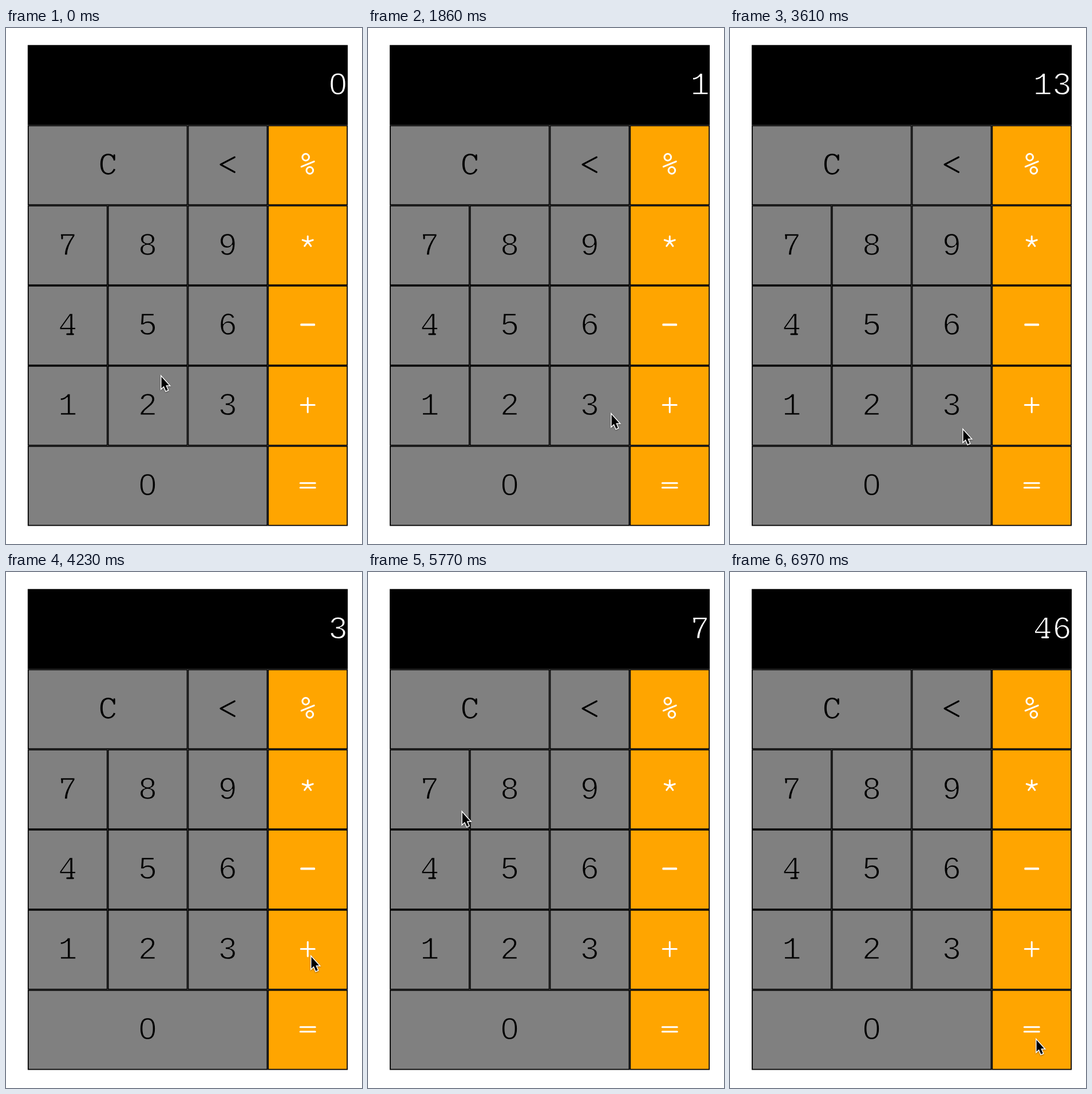
An HTML page that plays this animation: 622x900 px, repeating every 8 s.

```html
<!DOCTYPE html>
<html lang="en">
<head>
<meta charset="utf-8">
<title>Calculator</title>
<style>
  html, body { margin: 0; width: 100%; height: 100%; overflow: hidden; background: #fff; }
  svg { display: block; width: 622px; height: 900px; }
  text { font: 56px "Liberation Mono", "Courier New", monospace; text-anchor: middle; stroke-width: 1.5; }
  path { fill: none; stroke-width: 3; stroke-linecap: round; stroke-linejoin: round; }
  #cursor path { fill: #000; stroke: #fff; paint-order: stroke; stroke-linejoin: miter; }
  #cursor { filter: drop-shadow(0 1px 1px rgba(0, 0, 0, .4)); }
</style>
</head>
<body>
<svg viewBox="0 0 622 900">
  <g id="keys"></g>
  <g id="display"></g>
  <g id="cursor"><path d="M1.5 3.3V23.6L5.8 19.6L9.4 28L12.7 26.6L9.2 18.3H15Z"/></g>
</svg>
<script>
const LOOP = 8000, STEP = 78, PRESS = 240;
const CELL = 139.8, LEFT = 37.9, TOP = 29.7, LINE = 1.8, BASELINE = 16.4, ADVANCE = 33.6;
const $ = id => document.getElementById(id);

const bar = (y, half) => `M${-half} ${y}H${half}`;
const ring = (x, y, r) => `M${x - r} ${y}a${r} ${r} 0 1 0 ${2 * r} 0a${r} ${r} 0 1 0 ${-2 * r} 0`;
const star = (y, r) => [0, 1, 2, 3, 4].map(i => {
  const a = i * Math.PI * 2 / 5;
  return `M0 ${y}L${r * Math.sin(a)} ${y - r * Math.cos(a)}`;
}).join('');

// Operator signs, relative to the middle of their key
const signs = {
  '%': 'M-11 2.5L11 -6.5' + ring(-3.5, -14, 5.8) + ring(3.6, 9, 5.8),
  '*': star(-6.5, 9.5) + star(-6.5, 6),
  '-': bar(-2.1, 11.5) + bar(-.9, 11.5),
  '+': bar(-1.3, 12) + 'M0 -13.5V11.5',
  '=': bar(-4.8, 13) + bar(3.2, 13),
  '<': 'M12 -14L-12.5 -1.3L12 12'
};
// Slab serifs added to the plain letterforms, relative to the baseline
const serifs = { 4: 'M-1 -1.5H9.5', 7: 'M-9.8 -34V-28.5', C: 'M11.5 -34V-26' };

// The background-coloured outline thins the strokes of the glyph
function glyph(ch, x, y, ink, paper) {
  const at = dy => `transform="translate(${x} ${y + dy})"`;
  if (signs[ch]) return `<path ${at(0)} aria-label="${ch}" d="${signs[ch]}" stroke="${ink}"/>`;
  let out = `<text x="${x}" y="${y + BASELINE}" fill="${ink}" stroke="${paper}">${ch}</text>`;
  if (serifs[ch]) out += `<path ${at(BASELINE)} d="${serifs[ch]}" stroke="${ink}"/>`;
  if (ch === '0') out += `<ellipse ${at(BASELINE)} cy="-18.4" rx="5" ry="8.5" fill="${paper}"/>`;
  return out;
}

function box(col, row, span, paper) {
  return `<rect x="${LEFT + col * CELL + LINE / 2}" y="${TOP + row * CELL + LINE / 2}"
    width="${span * CELL - LINE}" height="${CELL - LINE}"
    fill="${paper}" stroke="#000" stroke-width="${LINE}"/>`;
}

// Repeated characters make one wide key
const rows = ['CC<%', '789*', '456-', '123+', '000='];
let html = box(0, 0, 4, '#000');
rows.forEach((row, r) => {
  for (let c = 0, span; c < 4; c += span) {
    const ch = row[c];
    span = row.lastIndexOf(ch) - c + 1;
    const [ink, paper] = c === 3 ? ['#fff', '#ffa500'] : ['#000', '#808080'];
    html += box(c, r + 1, span, paper) +
      glyph(ch, LEFT + (c + span / 2) * CELL, TOP + (r + 1.5) * CELL, ink, paper);
  }
});
$('keys').innerHTML = html;

// Pointer moves; a key pressed after arrival changes the reading
const moves = [
  { start: 0, end: 0, to: [270, 605], reads: '0' },
  { start: 440, end: 440, to: [266, 607] },
  { start: 580, end: 580, to: [149, 609] },
  { start: 840, end: 1300, to: [97, 669], reads: '1' },
  { start: 1700, end: 1860, to: [424, 671], reads: '13' },
  { start: 2260, end: 2590, to: [567, 382] },
  { start: 2920, end: 3610, to: [406, 698], reads: '3' },
  { start: 3930, end: 4080, to: [532, 668], reads: '39' },
  { start: 4250, end: 4790, to: [154, 465] },
  { start: 4870, end: 4950, to: [121, 387], reads: '7' },
  { start: 5770, end: 6090, to: [528, 667] },
  { start: 6160, end: 6330, to: [604, 775] },
  { start: 6400, end: 6560, to: [550, 832] },
  { start: 6730, end: 6730, to: [534, 813], reads: '46' }
];

const ease = u => u * u * (3 - 2 * u);

// The pointer advances in equal time steps, the first one at the start of the move
function cursorAt(t) {
  const i = moves.findLastIndex(m => t >= m.start);
  const { start, end, to } = moves[i];
  const from = i ? moves[i - 1].to : to;
  const gaps = Math.round((end - start) / STEP);
  const done = gaps ? Math.floor((t - start) / (end - start) * gaps + .1) : 0;
  const u = ease(Math.min(1, (done + 1) / (gaps + 1)));
  return from.map((v, axis) => v + (to[axis] - v) * u);
}

function readingAt(t) {
  return moves.findLast(m => m.reads && (m.end === 0 || t >= m.end + PRESS)).reads;
}

let shown;
function draw(t) {
  const value = readingAt(t);
  if (value !== shown) {
    shown = value;
    $('display').innerHTML = [...value].map((ch, i) =>
      glyph(ch, 580 - (value.length - 1 - i) * ADVANCE, TOP + CELL / 2 - .5, '#fff', '#000')).join('');
  }
  $('cursor').setAttribute('transform', `translate(${cursorAt(t)})`);
}

const begin = performance.now();
function tick() {
  draw((performance.now() - begin) % LOOP);
  requestAnimationFrame(tick);
}
tick();
</script>
</body>
</html>
```
